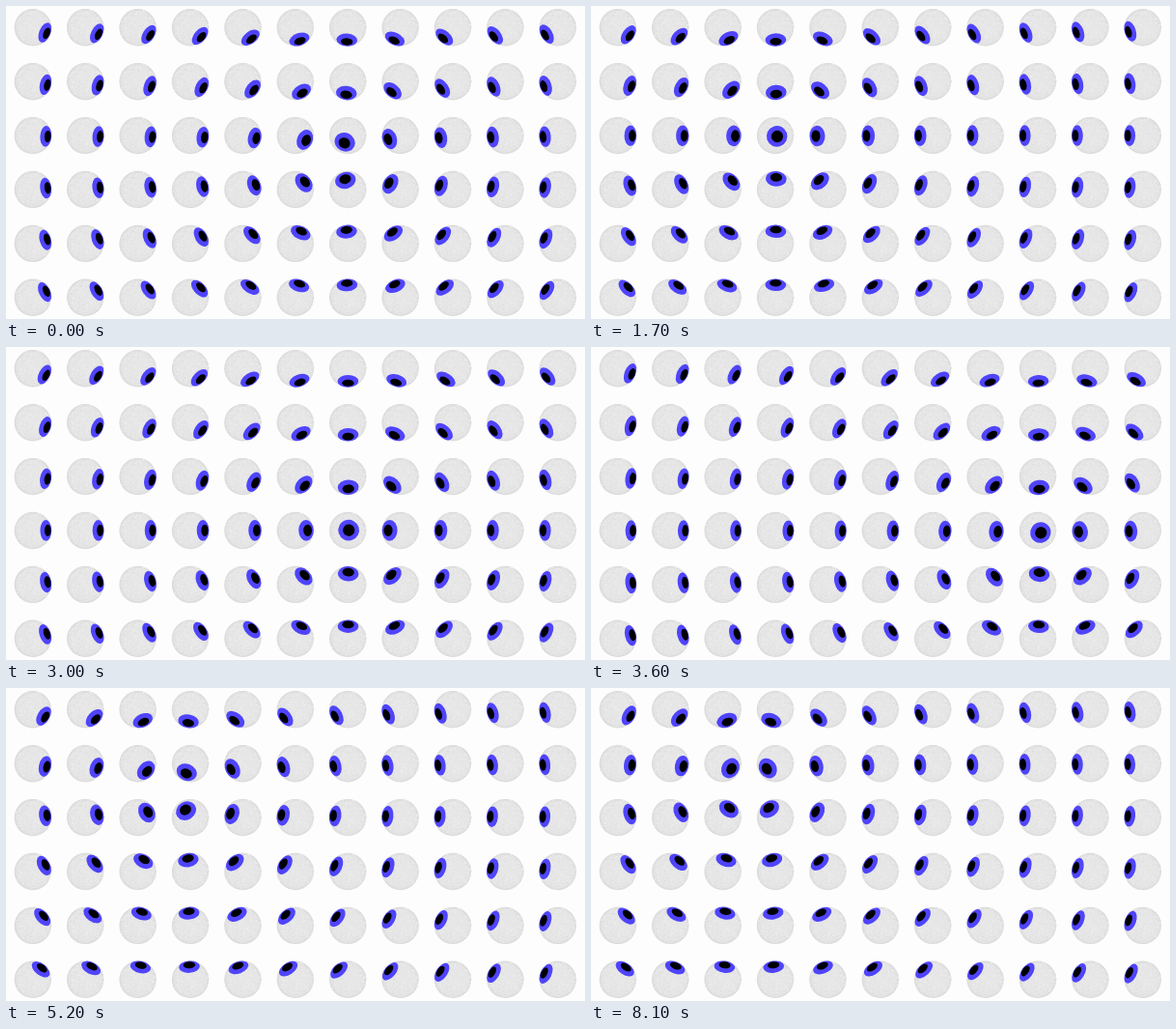
Write an HTML page that moves like this. It is 600 by 324 pixels and loops after 8200 ms.

```html
<!DOCTYPE html>
<html lang="en">
<head>
<meta charset="utf-8">
<title>Watching eyes</title>
<style>
  html, body { margin: 0; width: 100%; height: 100%; overflow: hidden; background: #fdfdfd; }
  svg { display: block; width: 100%; height: 100%; }
</style>
</head>
<body>
<svg id="stage" viewBox="0 0 600 324">
  <defs>
    <radialGradient id="shade">
      <stop offset="0" stop-color="#e8e8e8"/>
      <stop offset="0.85" stop-color="#e5e5e5"/>
      <stop offset="1" stop-color="#d9d9d9"/>
    </radialGradient>
    <g id="ball">
      <circle r="19.2" fill="url(#shade)"/>
      <path id="dark" stroke="#dcdcdc" fill="none"/>
      <path id="light" stroke="#efefef" fill="none"/>
    </g>
  </defs>
</svg>
<script>
const COLS = 11, ROWS = 6, LOOP = 8200, STEP = 100;
const R = 19.4;              // eyeball radius
const IRIS = Math.PI * 34 / 180;    // angular radii of the caps
const PUPIL = Math.PI * 18.5 / 180;
const DEPTH = 25, TURN = 2 / 3;

// Gaze path: [ms, x, y]
const PATH = [
  [0, 345, 154], [800, 401, 129.5], [1000, 400, 130], [1700, 195, 136],
  [2500, 245, 179], [3600, 470, 195], [4500, 240, 150], [5200, 177, 112],
  [6300, 161, 99], [8100, 164, 95]
];

const stage = document.getElementById('stage');

function add(name, attrs, parent = stage) {
  const el = document.createElementNS('http://www.w3.org/2000/svg', name);
  for (const key in attrs) el.setAttribute(key, attrs[key]);
  return parent.appendChild(el);
}

let seed = 7;
function random() {
  seed = (seed * 16807) % 2147483647;
  return seed / 2147483647;
}

function speckles(count) {
  let d = '';
  for (let i = 0; i < count; i++) {
    const r = 18.6 * Math.sqrt(random()), a = 2 * Math.PI * random();
    d += `M${(r * Math.cos(a)).toFixed(1)} ${(r * Math.sin(a)).toFixed(1)}h1`;
  }
  return d;
}
document.getElementById('dark').setAttribute('d', speckles(90));
document.getElementById('light').setAttribute('d', speckles(90));

const eyes = [];
for (let row = 0; row < ROWS; row++) {
  for (let col = 0; col < COLS; col++) {
    const x = 27.8 + 54.4 * col, y = 22.3 + 55.9 * row;
    const eye = add('g', { transform: `translate(${x} ${y})` });
    add('use', { href: '#ball' }, eye);
    const gaze = add('g', {}, eye);
    const iris = add('ellipse', { fill: '#4f44fa' }, gaze);
    const pupil = add('ellipse', { fill: '#000' }, gaze);
    eyes.push({ x, y, gaze, iris, pupil });
  }
}

// Monotone cubic slope at a key point
function slope(i, k) {
  if (i === 0 || i === PATH.length - 1) return 0;
  const [a, b, c] = [PATH[i - 1], PATH[i], PATH[i + 1]];
  const s = (b[k] - a[k]) / (b[0] - a[0]), t = (c[k] - b[k]) / (c[0] - b[0]);
  return s * t <= 0 ? 0 : 2 * s * t / (s + t);
}

function along(time, k) {
  let i = 0;
  while (i < PATH.length - 2 && time > PATH[i + 1][0]) i++;
  const a = PATH[i], b = PATH[i + 1], span = b[0] - a[0];
  const u = (time - a[0]) / span, v = 1 - u;
  return v * v * (1 + 2 * u) * a[k] + u * u * (1 + 2 * v) * b[k]
    + span * u * v * (v * slope(i, k) - u * slope(i + 1, k));
}

// A round cap on the sphere, tilted away from the viewer
function setCap(el, size, tilt) {
  el.setAttribute('cx', R * Math.cos(size) * Math.sin(tilt));
  el.setAttribute('rx', R * Math.sin(size) * Math.cos(tilt));
  el.setAttribute('ry', R * Math.sin(size));
}

function draw(time) {
  const tx = along(time, 1), ty = along(time, 2);
  for (const { x, y, gaze, iris, pupil } of eyes) {
    const dx = tx - x, dy = ty - y;
    const tilt = TURN * Math.atan(Math.hypot(dx, dy) / DEPTH);
    gaze.setAttribute('transform', `rotate(${Math.atan2(dy, dx) * 180 / Math.PI})`);
    setCap(iris, IRIS, tilt);
    setCap(pupil, PUPIL, tilt);
  }
}

const start = performance.now();
function tick() {
  const time = (performance.now() - start) % LOOP;
  draw(Math.floor(time / STEP) * STEP);
  requestAnimationFrame(tick);
}
tick();
</script>
</body>
</html>
```
